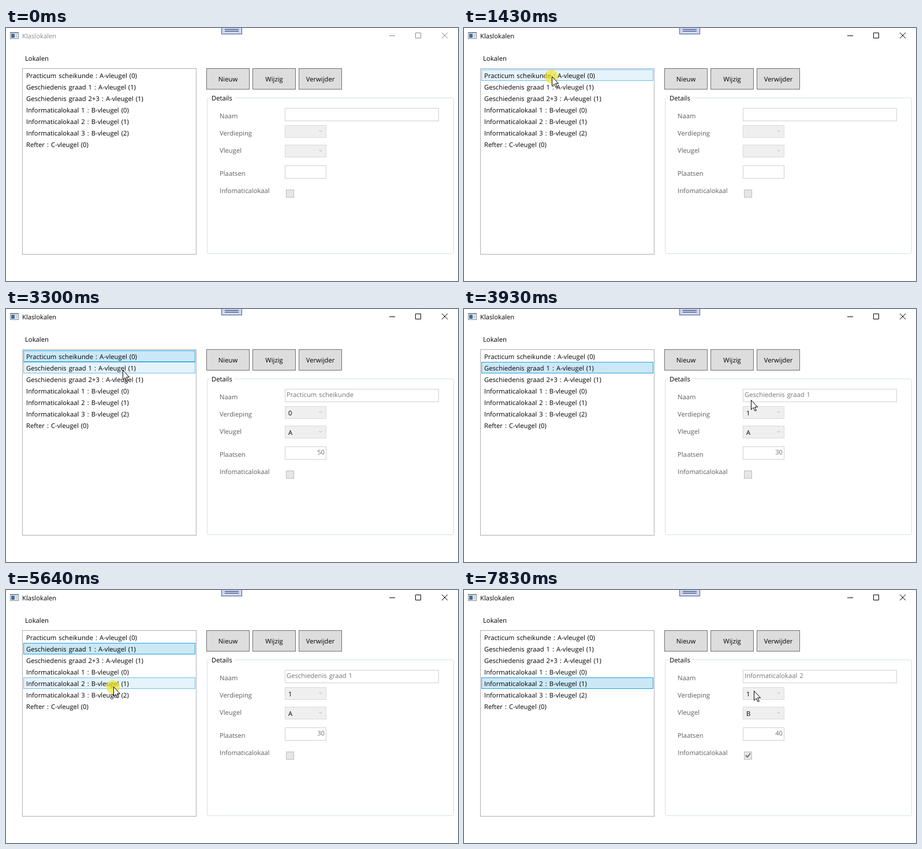
Recreate the animation shown at these times as an HTML page. Size 783 by 440 pixels, loop 8 s.

```html
<!DOCTYPE html>
<html lang="nl">
<head>
<meta charset="utf-8">
<title>Klaslokalen</title>
<style>
  html, body { margin: 0; width: 100%; height: 100%; overflow: hidden; background: #fff; }
  svg { display: block; width: 783px; height: 440px; }
  text {
    font: 11.25px "Open Sans", "Noto Sans", sans-serif;
    word-spacing: 1.1px;
    text-rendering: geometricPrecision;
    white-space: pre;
  }
</style>
</head>
<body>
<svg id="stage" viewBox="0 0 783 440"></svg>
<script>
const LOOP = 8000;
const stage = document.getElementById('stage');

function add(tag, attrs, text) {
  const el = document.createElementNS('http://www.w3.org/2000/svg', tag);
  for (const key in attrs) el.setAttribute(key, attrs[key]);
  if (text) el.textContent = text;
  return stage.appendChild(el);
}

// Pixel-aligned box with a one pixel border inside its bounds
const box = (x, y, w, h, fill, stroke, rx = 0) =>
  add('rect', { x: x + .5, y: y + .5, width: w - 1, height: h - 1, fill, stroke, rx });
const label = (x, y, text, fill = '#000', anchor = 'start') =>
  add('text', { x, y, fill, 'text-anchor': anchor }, text);
const line = (d, stroke, width = 1) =>
  add('path', { d, fill: 'none', stroke, 'stroke-width': width });

// Title bar
box(7, 7, 15, 12, '#f4f6f8', '#85898e');
add('rect', { x: 7, y: 7, width: 15, height: 2, fill: '#85898e' });
add('rect', { x: 9, y: 10, width: 6, height: 7, fill: '#3f6ea8' });
add('rect', { x: 16, y: 10, width: 4, height: 7, fill: '#cfd6dc' });
const caption = label(28, 18, 'Klaslokalen');
const controls = line('M664 13.5H674M709.5 8.5H718.5V17.5H709.5ZM755 8L765 18M765 8L755 18', '#000');
box(373, -2, 36, 13, '#ccd6f2', '#4d5f96');
line('M379 2.5H403M379 5.5H403', '#26345f');

// Room list
const rooms = [
  'Practicum scheikunde : A-vleugel (0)',
  'Geschiedenis graad 1 : A-vleugel (1)',
  'Geschiedenis graad 2+3 : A-vleugel (1)',
  'Informaticalokaal 1 : B-vleugel (0)',
  'Informaticalokaal 2 : B-vleugel (1)',
  'Informaticalokaal 3 : B-vleugel (2)',
  'Refter : C-vleugel (0)'
];
label(33, 57, 'Lokalen');
box(28, 70, 302, 324, '#fff', '#abadb3');
const rows = rooms.map((name, i) => {
  const row = box(30, 72 + 20 * i, 298, 20, 'none', 'none');
  label(35, 87 + 20 * i, name);
  return row;
});

// Buttons
['Nieuw', 'Wijzig', 'Verwijder'].forEach((name, i) => {
  box(347 + 80 * i, 70, 75, 37, '#ddd', '#707070');
  label(384.5 + 80 * i, 93, name, '#000', 'middle');
});

// Details panel
box(348, 121, 428, 272, 'none', '#d5dfe5', 3);
add('rect', { x: 354, y: 119, width: 42, height: 5, fill: '#fff' });
label(356, 126, 'Details');
[['Naam', 157], ['Verdieping', 187], ['Vleugel', 217], ['Plaatsen', 257], ['Infomaticalokaal', 287]]
  .forEach(([name, y]) => label(370, y, name, '#5e5e5e'));
box(483, 139, 267, 23, '#fff', '#cfd0d4');
box(483, 239, 72, 23, '#fff', '#cfd0d4');
for (const y of [169, 203]) {
  box(483, y, 72, 22, '#efefef', '#d9d9d9');
  line(`M542.5 ${y + 9}L545 ${y + 11.5}L547.5 ${y + 9}`, '#b4b4b4');
}
box(485, 281, 14, 14, '#e6e6e6', '#bcbcbc');
const fields = [
  label(486, 153, '', '#747474'),
  label(489, 185, ''),
  label(489, 219, ''),
  label(552, 253, '', '#747474', 'end')
];
const check = line('M488 287.5L491 290.5L496 284', '#707070', 2);

// Pointer
const halo = add('circle', { r: 11.5, fill: '#f3e61c', opacity: .68 });
const arrow = add('path', {
  d: 'M.5 .5V17L4.3 13.4L7 19.4L9.3 18.4L6.7 12.5H11.6Z',
  fill: '#fff', stroke: '#000'
});

// Selection: start time, row, field values, checkbox
const picks = [
  [1500, 0, ['Practicum scheikunde', '0', 'A', '50'], false],
  [3540, 1, ['Geschiedenis graad 1', '1', 'A', '30'], false],
  [5720, 4, ['Informaticalokaal 2', '1', 'B', '40'], true]
];
const clicks = [[1200, 1600], [3390, 3700], [5490, 5790]];

// Pointer moves: first step, last step, steps, end x, end y, sideways bow
const moves = [
  [500, 1030, 8, 152, 84, 0],
  [1910, 2290, 6, 512, 138, 0],
  [2370, 2690, 5, 520, 245, 0],
  [2830, 3300, 7, 202, 106, 0],
  [3700, 3930, 4, 497, 158, 0],
  [4010, 4480, 7, 520, 298, 0],
  [4560, 5340, 11, 186, 168, 0],
  [6210, 6660, 7, 502, 146, 0],
  [6810, 7210, 6, 502, 288, 5],
  [7600, 7830, 4, 502, 175, -3]
];
const easeOut = p => Math.sin(p * Math.PI / 2);
const easeInOut = p => (1 - Math.cos(p * Math.PI)) / 2;

function pointerAt(t) {
  let x = 200, y = 455;
  for (const [i, [t0, t1, n, ex, ey, bow]] of moves.entries()) {
    if (t < t0) break;
    const step = Math.min(n - 1, Math.floor((t - t0) / (t1 - t0) * (n - 1) + .2));
    const p = (step + 1) / n;
    const e = i ? easeInOut(p) : easeOut(p);
    x += (ex - x) * e + bow * Math.sin(Math.PI * p);
    y += (ey - y) * e;
  }
  return [Math.round(x), Math.round(y)];
}

function draw(t) {
  const [x, y] = pointerAt(t);
  const shown = t >= 500;
  const hover = shown && x >= 30 && x < 328 ? Math.floor((y - 72) / 20) : -1;
  const [, chosen, values, checked] = picks.filter(p => t >= p[0]).pop() || [0, -1, [], false];

  const ink = t >= 1350 ? '#000' : '#8a8a8a';
  caption.setAttribute('fill', ink);
  controls.setAttribute('stroke', ink);

  rows.forEach((row, i) => {
    const [fill, stroke] = i === chosen ? ['#cbe8f6', '#26a0da']
      : i === hover ? ['#e5f3fb', '#70c0e7'] : ['none', 'none'];
    row.setAttribute('fill', fill);
    row.setAttribute('stroke', stroke);
  });
  fields.forEach((field, i) => { field.textContent = values[i] || ''; });
  check.style.display = checked ? '' : 'none';

  const pressed = clicks.some(([a, b]) => t >= a && t < b);
  halo.style.display = pressed ? '' : 'none';
  halo.setAttribute('cx', x - .7);
  halo.setAttribute('cy', y + .5);
  arrow.style.display = shown ? '' : 'none';
  arrow.setAttribute('transform', `translate(${x} ${y})`);
}

const start = performance.now();
function tick() {
  draw((performance.now() - start) % LOOP);
  requestAnimationFrame(tick);
}
tick();
</script>
</body>
</html>
```
